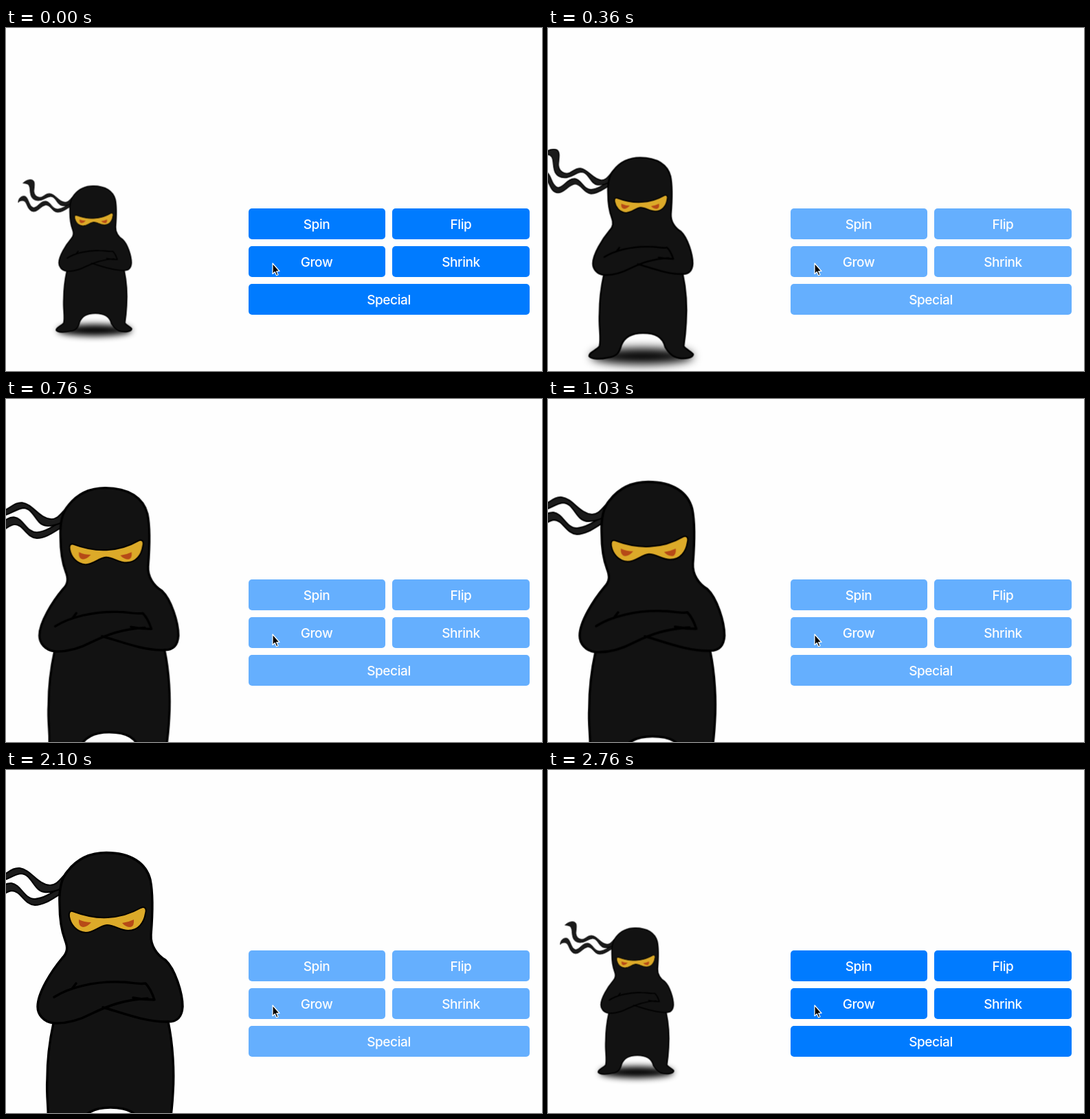
Write an HTML page that moves like this. It is 780 px wide and 500 px high and loops after 2.83 s.

```html
<!DOCTYPE html>
<html lang="en">
<head>
<meta charset="utf-8">
<title>Growing ninja</title>
<style>
  html, body { margin: 0; width: 100%; height: 100%; overflow: hidden; background: #fefefe; }
  svg { display: block; width: 780px; height: 500px; }

  .ninja {
    transform-origin: 108px 340px;
    animation: grow 2830ms linear infinite;
    stroke: #000;
    stroke-width: 3.4;
    stroke-linejoin: round;
    stroke-linecap: round;
  }
  .shadow { fill: #000; stroke: none; filter: url(#soft); }
  .ribbon { fill: #1b1b1b; stroke-width: 2; }
  .body { fill: #121212; }
  .arms { fill: none; }
  .mask { fill: #dcaa29; stroke-width: 2; }
  .eyes { fill: #b64a17; stroke: none; }

  .buttons { animation: disable 2830ms step-end infinite; }
  .buttons rect { fill: #007bff; height: 45px; rx: 5px; }
  .buttons text {
    fill: #fff;
    font: 500 19px Inter, Roboto, sans-serif;
    letter-spacing: -.4px;
    text-anchor: middle;
  }
  .cursor { fill: #000; stroke: #fff; stroke-width: 1.2; stroke-linejoin: round; }

  /* grows from 135 to 1095 ms, snaps back at 2160 ms */
  @keyframes grow {
    0% { transform: scale(.5); }
    4.77% { transform: scale(.5); animation-timing-function: ease; }
    38.69% { transform: scale(1); animation-timing-function: step-end; }
    76.32%, 100% { transform: scale(.5); }
  }
  @keyframes disable {
    0% { opacity: 1; }
    3.53% { opacity: .6; }
    76.32%, 100% { opacity: 1; }
  }
</style>
</head>
<body>
<svg viewBox="0 0 780 500">
  <defs>
    <filter id="soft" x="-30%" y="-150%" width="160%" height="400%">
      <feGaussianBlur stdDeviation="10"/>
    </filter>
  </defs>

  <g class="ninja">
    <ellipse class="shadow" cx="150" cy="541" rx="108" ry="17"/>
    <path class="ribbon" d="M-72 168C-72 156-62 148-52 151C-42 156-42 180-28 184C-16 184-8 164 8 165C22 167 26 188 42 188C56 187 68 178 82 169L84 178C72 184 58 197 42 197C26 196 22 176 8 176C-6 178-14 195-28 195C-46 194-46 166-56 164C-62 162-68 163-72 168Z"/>
    <path class="ribbon" d="M-58 112C-50 104-38 100-30 104C-22 109-27 126-27 136C-26 150-14 156-4 153C4 149 10 142 20 143C36 145 46 167 64 168C74 168 78 160 86 152L82 172C74 176 66 179 56 178C40 176 38 152 22 151C10 152 0 163-14 163C-40 162-36 138-39 124C-42 112-50 114-58 112Z"/>
    <path class="body" d="M146 120.500C182 120.500 204 136 210 160C215 184 213 215 211 240C210 256 220 270 232 277C246 290 257 325 257 345C256 362 248 367 236 367C243 400 245 440 243 470C242 490 240 506 238 520C244 528 254 531 258 537C258 545 240 547 228 545C212 543 204 530 199 522C194 500 178 492 152 492C126 492 112 502 106 518C102 534 96 542 78 544C62 548 42 548 38 541C38 532 52 530 60 520C64 500 58 480 60 450C60 420 64 392 69 369C54 367 46 356 46 345C46 325 66 293 82 274C90 266 90 258 86 248C80 232 78 215 78 196C77 176 80 158 90 147C104 129 122 120.500 146 120.500Z"/>
    <path class="arms" d="M70 331C92 317 128 308 165 309C180 309 194 313 203 311C209 317 213 326 216 335Q200 335 185 332M206 333C172 335 150 343 125 355C106 365 88 370 69 369M102 311L96 319M141 346C164 352 202 368 236 367"/>
    <path class="mask" d="M97 206C113 212 130 216 148 215C168 214 184 208 196 201C202 198 205 202 203 209C201 222 193 234 178 234C166 234 158 226 147 226C136 227 128 237 116 237C102 236 94 225 92 214C91 208 93 205 97 206Z"/>
    <path class="eyes" d="M106 218Q114 222 124 222Q118 229 112 229Q105 228 106 218ZM169 223Q178 222 186 218Q187 228 181 229Q174 229 169 223Z"/>
  </g>

  <g class="buttons">
    <rect x="353" y="263" width="199"/>
    <rect x="562" y="263" width="200"/>
    <rect x="353" y="318" width="199"/>
    <rect x="562" y="318" width="200"/>
    <rect x="353" y="373" width="409"/>
    <text x="452" y="293">Spin</text>
    <text x="662" y="293">Flip</text>
    <text x="452" y="348">Grow</text>
    <text x="662" y="348">Shrink</text>
    <text x="557" y="403">Special</text>
  </g>

  <path class="cursor" d="M388 343V358.500L391.300 355.400L393.600 360.800L396 359.800L393.700 354.500H398Z"/>
</svg>
</body>
</html>
```
